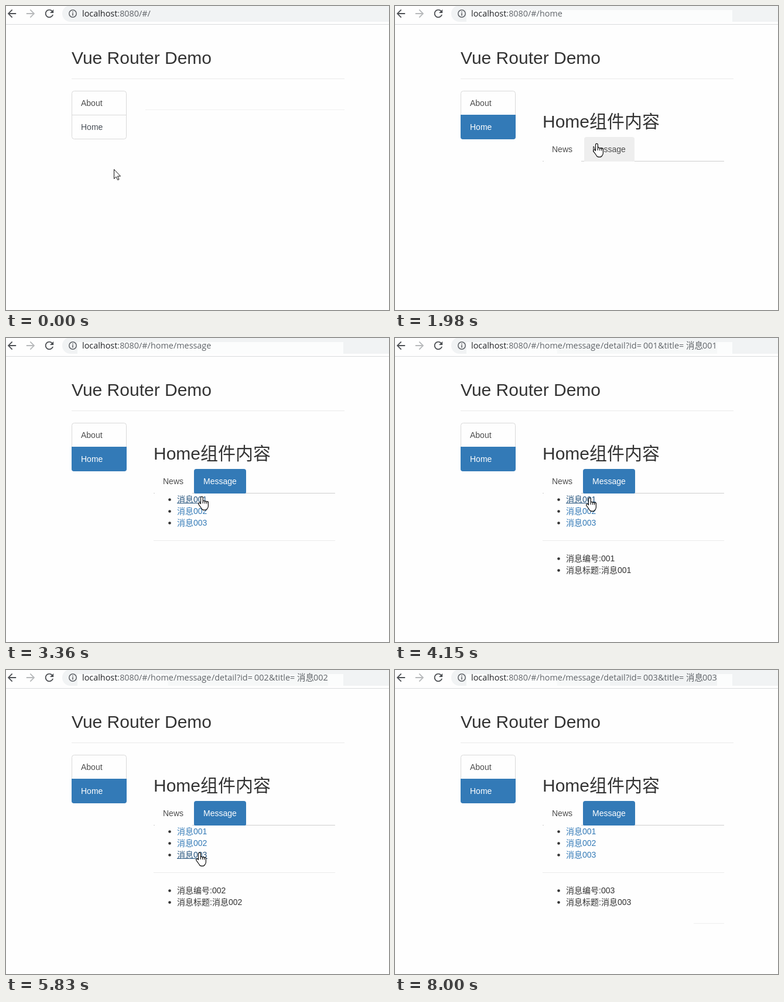
Write an HTML page with a canvas that moves like this. It is 654x520 px and loops after 8100 ms.

```html
<!DOCTYPE html>
<html lang="zh-CN">
<head>
<meta charset="utf-8">
<title>Vue Router Demo</title>
<style>
  html, body { margin: 0; width: 100%; height: 100%; overflow: hidden; background: #fefefe; }
  canvas { display: block; }
</style>
</head>
<body>
<canvas id="stage" width="654" height="520"></canvas>
<script>
const ctx = document.getElementById('stage').getContext('2d');
const LOOP = 8100;
const PAGE = '#fefefe', PILL = '#f1f3f4', BLUE = '#337ab7', INK = '#333';
const SANS = '"Liberation Sans", "Noto Sans CJK SC", "Noto Sans CJK", sans-serif';
const URL_FONT = '14.4px "Open Sans", "Noto Sans CJK SC", "Noto Sans CJK", sans-serif';

const BACK = new Path2D('M20 11H7.83l5.59-5.59L12 4l-8 8 8 8 1.41-1.41L7.83 13H20v-2z');
const RELOAD = new Path2D('M17.65 6.35C16.2 4.9 14.21 4 12 4c-4.42 0-7.99 3.58-7.99 8s3.57 8 7.99 8c3.73 0 6.84-2.55 7.73-6h-2.08c-.82 2.33-3.04 4-5.65 4-3.31 0-6-2.69-6-6s2.69-6 6-6c1.66 0 3.14.69 4.22 1.78L13 11h7V4l-2.35 2.35z');
const ARROW = new Path2D('M.5 .5V16.5L4 13L6.8 18.6L9 17.6L6.5 12.1H11.5Z');
const HAND = new Path2D('M-1.5 2.3a1.9 1.9 0 0 1 3.8 0V8.3a1.8 1.8 0 0 1 3.3 .4a1.8 1.8 0 0 1 3.1 .8a1.5 1.5 0 0 1 2.7 1.4V16.5Q11.4 19 9.5 21Q8.8 23.4 5 23.4Q1 23.4 .2 21L-5.2 13.4a1.7 1.7 0 0 1 2.5-2.2L-1.5 12.6Z');
const KNUCKLES = new Path2D('M2.3 8.5V12M5.6 9V12.2M8.7 9.8V12.4');

// Pointer trips: start time, time of last step, steps, destination
const START = [184, 279];
const TRIPS = [
  [430, 890, 9, 172, 211],
  [1570, 2150, 11, 369, 239],
  [2890, 3480, 10, 332, 273],
  [4150, 4560, 8, 330, 292],
  [5550, 5890, 7, 330, 315],
  [6990, 7760, 14, 635, 512]
];

const ease = p => p * p * p * (p * (6 * p - 15) + 10);
const inside = ([x, y], l, t, r, b) => x >= l && x < r && y >= t && y < b;

function pointerAt(time) {
  let [x, y] = START;
  for (const [from, to, steps, tx, ty] of TRIPS) {
    if (time < from) break;
    const gap = (to - from) / (steps - 1);
    const step = Math.min(steps, Math.floor((time - from) / gap + 1e-6) + 1);
    const p = ease(step / steps);
    x += (tx - x) * p;
    y += (ty - y) * p;
  }
  return [Math.round(x), Math.round(y)];
}

function rect(color, x, y, w, h) {
  ctx.fillStyle = color;
  ctx.fillRect(x, y, w, h);
}

function rounded(color, x, y, w, h, radii) {
  ctx.fillStyle = color;
  ctx.beginPath();
  ctx.roundRect(x, y, w, h, radii);
  ctx.fill();
}

function text(str, x, y, color = INK, font = '14px ' + SANS) {
  ctx.font = font;
  ctx.fillStyle = color;
  ctx.fillText(str, x, y);
}

function dot(x, y, r, color) {
  ctx.fillStyle = color;
  ctx.beginPath();
  ctx.arc(x, y, r, 0, 7);
  ctx.fill();
}

function icon(path, x, y, color, flip = 1) {
  ctx.save();
  ctx.translate(x, y);
  ctx.scale(0.9 * flip, 0.9);
  ctx.translate(-12, -12);
  ctx.fillStyle = color;
  ctx.fill(path);
  ctx.restore();
}

function drawBar(home, message, id) {
  rounded(PILL, 96, -1, 600, 28, 14);
  if (home) rect('#fcfdfd', 122, 7, 454, 20);
  if (id) rect('#f6f8f8', 277, 7, 273, 20);
  if (id === 3) rect(PILL, 367, 7, 183, 20);
  rect('#dadcde', 0, 31, 654, 1);

  icon(BACK, 10, 13, '#4c4f53');
  icon(BACK, 42, 13, '#b6b8ba', -1);
  icon(RELOAD, 74, 13, '#4c4f53');
  ctx.strokeStyle = '#5f6368';
  ctx.lineWidth = 1.5;
  ctx.beginPath();
  ctx.arc(114, 13, 6.2, 0, 7);
  ctx.stroke();
  rect('#5f6368', 113.2, 12, 1.6, 4.5);
  rect('#5f6368', 113.2, 9.4, 1.6, 1.6);

  const grey = '#5f6368';
  text('localhost', 130, 18, '#202124', URL_FONT);
  const hostWidth = ctx.measureText('localhost').width;
  const path = ':8080/#/' + (home ? 'home' : '') + (message ? '/message' : '');
  text(path, 130 + hostWidth, 18, grey, URL_FONT);
  if (id) {
    const no = '00' + id;
    const parts = [['/detail', 351], ['?id=', 394], [no, 424], ['&title=', 449], ['消息', 497], [no, 525]];
    for (const [part, x] of parts) text(part, x, 18, grey, URL_FONT);
  }
}

function drawMenu(home) {
  text('Vue Router Demo', 112, 99, INK, '30px ' + SANS);
  rect('#ebebeb', 112, 124, 466, 1);

  ctx.strokeStyle = '#d9d9d9';
  ctx.lineWidth = 1;
  ctx.beginPath();
  ctx.roundRect(112.5, 145.5, 93, 82, 4);
  ctx.stroke();
  rect('#d9d9d9', 112, 186, 94, 1);
  if (home) rounded(BLUE, 112, 186, 94, 42, [0, 0, 4, 4]);
  text('About', 128, 171, '#4d4d4d');
  text('Home', 128, 212, home ? '#fff' : '#4a5058');
}

function drawTabs(message, over) {
  text('Home组件内容', 252, 208, INK, '30px ' + SANS);
  rect('#cfcfcf', 252, 265, 310, 1);
  rounded(over === 'news' ? '#eee' : PAGE, 254, 224, 64, 42, [4, 4, 0, 0]);
  if (message) rounded(BLUE, 321, 224, 89, 42, [4, 4, 2, 2]);
  else rounded(over === 'message' ? '#eee' : PAGE, 323, 224, 86, 42, [4, 4, 0, 0]);
  text('News', 268, 250, '#4d4d4d');
  text('Message', 337, 250, message ? '#fff' : '#4d4d4d');
}

function bullet(str, y, color) {
  dot(279.5, y + 0.5, 2.3, INK);
  text(str, 292, y + 5, color);
}

function drawMessages(hovered, id, tailLine) {
  for (let i = 1; i <= 3; i++) {
    const y = 256 + i * 20, on = i === hovered;
    bullet('消息00' + i, y, on ? '#23527c' : BLUE);
    if (on) rect('#23527c', 292, y + 6, 52, 1);
  }
  rect('#ebebeb', 252, 346, 310, 1);
  if (!id) return;
  bullet('消息编号:00' + id, 377, INK);
  bullet('消息标题:消息00' + id, 397, INK);
  if (tailLine) rect('#efefef', 510, 433, 52, 1);
}

function drawPointer([x, y], hand) {
  ctx.save();
  ctx.translate(x, y);
  ctx.lineJoin = 'round';
  ctx.lineWidth = hand ? 1.2 : 1;
  ctx.fillStyle = '#fff';
  ctx.strokeStyle = '#111';
  ctx.fill(hand ? HAND : ARROW);
  ctx.stroke(hand ? HAND : ARROW);
  if (hand) ctx.stroke(KNUCKLES);
  ctx.restore();
}

function draw(time) {
  const home = time >= 1070;
  const message = time >= 2400;
  const id = [3720, 4810, 6130].filter(t => time >= t).length;
  const tip = pointerAt(time);

  let over = null;
  if (inside(tip, 112, 145, 206, 228)) over = 'menu';
  else if (home && inside(tip, 254, 224, 318, 266)) over = 'news';
  else if (home && inside(tip, 321, 224, 410, 266)) over = 'message';
  const row = message && inside(tip, 292, 266, 344, 326) ? Math.floor((tip[1] - 266) / 20) + 1 : 0;
  // The last link keeps its hover style for a while after the pointer leaves
  const hovered = id === 3 ? (time < 8000 ? 3 : 0) : row;

  rect(PAGE, 0, 0, 654, 520);
  drawBar(home, message, id);
  drawMenu(home);
  if (home) drawTabs(message, over);
  else rect('#f0f0f0', 238, 177, 340, 1);
  if (message) drawMessages(hovered, id, time >= 7400);
  if (time < 7760) drawPointer(tip, over || row);
}

const begin = performance.now();
function tick() {
  draw((performance.now() - begin) % LOOP);
  requestAnimationFrame(tick);
}
tick();
</script>
</body>
</html>
```
